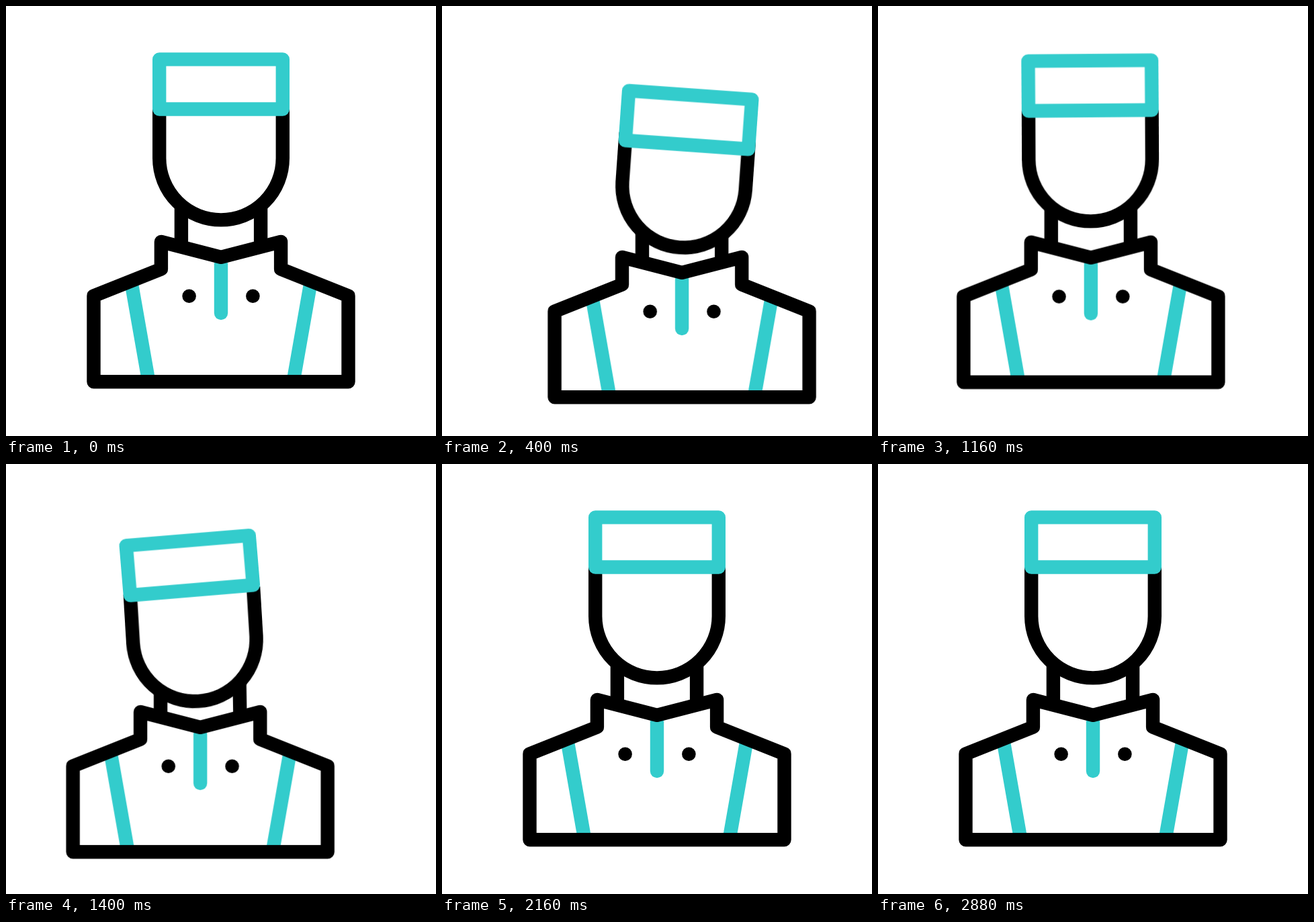
Recreate the animation shown at these times as an HTML page. Size 640x640 px, loop 3000 ms.

```html
<!DOCTYPE html>
<html lang="en">
<head>
<meta charset="utf-8">
<title>Bowing bellhop</title>
<style>
  html, body { margin: 0; width: 100%; height: 100%; overflow: hidden; background: #fff; }
  svg { display: block; width: 100%; height: 100%; }
  svg * { transform-box: view-box; }
  .ink, .teal { fill: none; stroke: #000; stroke-width: 20.4; stroke-linejoin: round; }
  .teal { stroke: #3cc; }
  .solid { fill: #fff; }
  .round { stroke-linecap: round; }

  .sway, .dip, .head, .hat, .neck { animation: 3s cubic-bezier(.167, 0, .667, 1) infinite; }
  .sway { animation-name: sway; }
  .dip { animation-name: dip; }
  .head { animation-name: head; transform-origin: 320px 226.6px; }
  .hat { animation-name: hat; transform-origin: 320px 153.5px; }
  .neck { animation-name: neck; transform-origin: 379px 352px; }

  /* Body: right, over the middle, left, back */
  @keyframes sway {
    0%, 4% { transform: translateX(0); }
    13.333% { transform: translateX(37.1px); }
    24% { transform: translateX(37.1px); animation-timing-function: cubic-bezier(.18, 0, .68, 1); }
    37.333% { transform: translateX(0); animation-timing-function: cubic-bezier(.16, .04, .63, 1); }
    50.667%, 60% { transform: translateX(-36.6px); }
    70.667%, 100% { transform: translateX(0); }
  }
  @keyframes dip {
    0%, 4% { transform: translateY(0); }
    13.333% { transform: translateY(23px); }
    24% { transform: translateY(23px); animation-timing-function: cubic-bezier(.167, 0, .55, 1); }
    37.333% { transform: translateY(0); animation-timing-function: cubic-bezier(.333, 0, .667, 1); }
    50.667%, 60% { transform: translateY(23px); }
    70.667%, 100% { transform: translateY(0); }
  }

  /* Head: bows with the body, then nods to both sides alone */
  @keyframes head {
    0%, 4% { transform: translate(0, 0) rotate(0deg); }
    13.333% { transform: translate(3px, 18.2px) rotate(4.06deg); }
    24% { transform: translate(3px, 18.2px) rotate(4.06deg); animation-timing-function: cubic-bezier(.333, 0, .667, 1); }
    37.333% { transform: translate(0, 0) rotate(0deg); }
    50.667% { transform: translate(-10.2px, 20.4px) rotate(-4.2deg); }
    60% { transform: translate(-10.2px, 20.4px) rotate(-4.2deg); animation-timing-function: cubic-bezier(.333, 0, .667, 1); }
    72% { transform: translate(0, 0) rotate(0deg); }
    78.667% { transform: translate(1.5px, 12.7px) rotate(2deg); }
    84% { transform: translate(0, 0) rotate(0deg); }
    89.333% { transform: translate(-3.4px, 12.7px) rotate(-2.2deg); }
    96%, 100% { transform: translate(0, 0) rotate(0deg); }
  }
  @keyframes hat {
    0%, 4% { transform: translateY(0) rotate(0deg); }
    13.333% { transform: translateY(11.7px) rotate(0deg); }
    24% { transform: translateY(11.7px) rotate(0deg); animation-timing-function: cubic-bezier(.333, 0, .667, 1); }
    32%, 37.333% { transform: translateY(0) rotate(0deg); }
    50.667% { transform: translateY(-.8px) rotate(-1.6deg); }
    60% { transform: translateY(-.8px) rotate(-1.6deg); animation-timing-function: cubic-bezier(.333, 0, .667, 1); }
    72%, 100% { transform: translateY(0) rotate(0deg); }
  }
  @keyframes neck {
    0%, 37.333% { transform: rotate(0deg); }
    50.667%, 60% { transform: rotate(-1.1deg); }
    70.667%, 100% { transform: rotate(0deg); }
  }
</style>
</head>
<body>
<svg viewBox="0 0 640 640">
  <g class="sway"><g class="dip">
    <path class="ink" d="M260.9 290V354"/>
    <path class="ink neck" d="M379.1 290V354"/>
    <path class="teal" d="M186.6 412L211.9 556M453.4 412L428.1 556"/>
    <path class="teal round" d="M320 384V457"/>
    <path class="ink" d="M130.5 559.3V431.5L230.9 391.5V350.9L320 373.8L409.1 350.9V391.5L509.5 431.5V559.3Z"/>
    <circle cx="272.6" cy="431.7" r="10.3"/>
    <circle cx="367.4" cy="431.7" r="10.3"/>
    <g class="head">
      <path class="ink solid" d="M228.2 153.5V226.6A91.8 91.8 0 0 0 411.8 226.6V153.5"/>
      <rect class="teal solid hat" x="228.2" y="79.4" width="183.6" height="74.1"/>
    </g>
  </g></g>
</svg>
</body>
</html>
```
